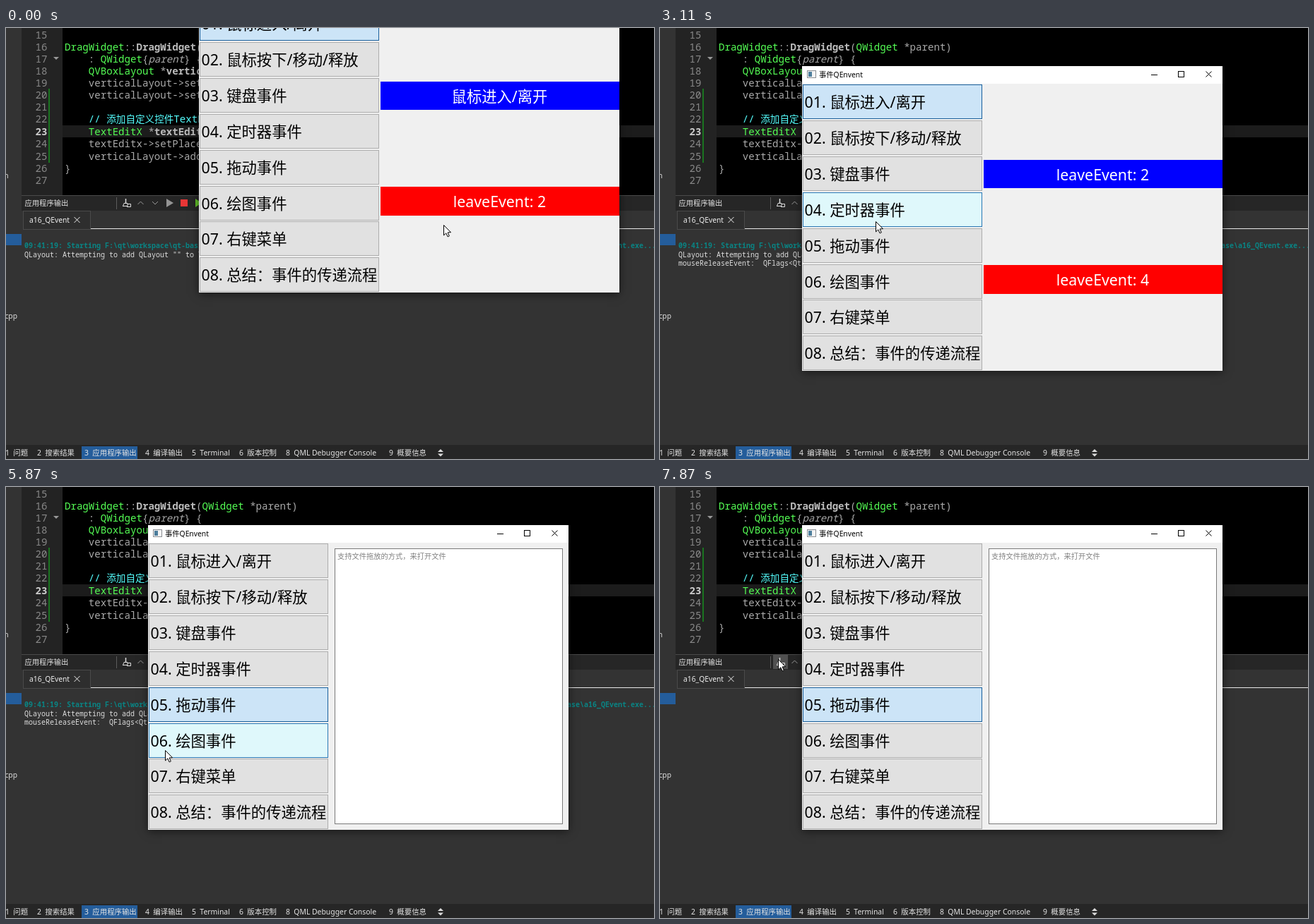
An HTML page with a canvas that plays this animation: 917x611 px, repeating every 8000 ms.

```html
<!DOCTYPE html>
<html lang="zh-CN">
<head>
<meta charset="utf-8">
<title>QEvent</title>
<style>
html, body { margin: 0; width: 100%; height: 100%; overflow: hidden; background: #333; }
canvas { display: block; }
</style>
</head>
<body>
<canvas id="stage" width="917" height="611"></canvas>
<script>
const ctx = document.getElementById('stage').getContext('2d');
const LOOP = 8000;
const UI = '"Noto Sans", "Noto Sans CJK SC", "Noto Sans CJK JP", sans-serif';
const MONO = '"Noto Sans Mono", "Noto Sans CJK SC", monospace';
const SMALL = '10.3px ' + UI;
const BIG = '21.33px ' + UI;
const LOG = '10px ' + MONO;

const rect = (x, y, w, h, color) => {
  ctx.fillStyle = color;
  ctx.fillRect(x, y, w, h);
};

const frame = (x, y, w, h, fill, edge) => {
  rect(x, y, w, h, edge);
  rect(x + 1, y + 1, w - 2, h - 2, fill);
};

const text = (s, x, y, font, color, align = 'left') => {
  ctx.font = font;
  ctx.fillStyle = color;
  ctx.textAlign = align;
  ctx.fillText(s, x, y);
};

const trace = points => {
  ctx.beginPath();
  points.forEach(([x, y], i) => i ? ctx.lineTo(x, y) : ctx.moveTo(x, y));
};

const line = (points, color, width = 1) => {
  trace(points);
  ctx.strokeStyle = color;
  ctx.lineWidth = width;
  ctx.stroke();
};

const shape = (points, color) => {
  trace(points);
  ctx.closePath();
  ctx.fillStyle = color;
  ctx.fill();
};

const cross = (x, y, r, color) => {
  line([[x - r, y - r], [x + r, y + r]], color);
  line([[x - r, y + r], [x + r, y - r]], color);
};

// ---- pointer: [first step, last step, step count, path] ----
const MOVES = [
  [70, 410, 6, [[619, 279], [628, 258], [640, 205], [655, 140], [672, 80], [690, 6], [704, -39]]],
  [810, 1030, 4, [[704, -39], [696, -27], [672, 8], [650, 46], [632, 72]]],
  [1500, 1780, 5, [[632, 72], [626, 69], [609, 76]]],
  [1850, 2270, 7, [[609, 76], [559, 87]]],
  [2340, 3110, 12, [[559, 87], [480, 135], [400, 190], [340, 240], [305, 274]]],
  [3190, 3600, 6, [[305, 274], [304, 296], [304, 309]]],
  [4130, 4410, 5, [[304, 309], [306, 268], [305, 306]]],
  [4620, 4690, 2, [[305, 306], [304, 314]]],
  [5450, 6220, 12, [[304, 313], [285, 350], [205, 380], [97, 402]]],
  [6290, 6860, 9, [[97, 402], [130, 300], [167, 244]]]
];
const PRESSES = [[740, 1300], [4760, 4900], [6930, 7130]];
const DRAG_FROM = [704, -39];
const MOVED = [72, -111];

const between = (t, a, b) => t >= a && t < b;

function along(path, f) {
  const p = f * (path.length - 1);
  const i = Math.min(Math.floor(p), path.length - 2);
  return [0, 1].map(k => path[i][k] + (path[i + 1][k] - path[i][k]) * (p - i));
}

function pointerAt(t) {
  let tip = MOVES[0][3][0];
  for (const [start, end, count, path] of MOVES) {
    if (t < start) break;
    const step = (end - start) / (count - 1);
    const k = Math.min(count, Math.floor((t - start) / step + 1e-6) + 1);
    tip = along(path, k / count).map(Math.round);
  }
  return tip;
}

function drawPointer([x, y], pressed) {
  if (pressed) {
    ctx.beginPath();
    ctx.arc(x - 0.5, y, 10, 0, Math.PI * 2);
    ctx.fillStyle = 'rgba(236,190,60,.8)';
    ctx.fill();
  }
  const arrow = [[0, 0], [0, 14.4], [3.3, 11.3], [5.6, 16.4], [7.8, 15.4], [5.6, 10.4], [10, 10.2], [0, 0]];
  const placed = arrow.map(([a, b]) => [x + 0.5 + a, y + 0.5 + b]);
  shape(placed, '#fff');
  line(placed, '#000');
}

// ---- editor ----
const CODE = 14.1;
const STYLES = {
  n: ['', '#aaa'], b: ['bold ', '#bbb'], i: ['italic ', '#aaa'],
  t: ['', '#5f5'], k: ['', '#ff5'], c: ['', '#5ff'], s: ['', '#f5f'],
  C: ['', '#5ff', 13.6], S: ['', '#f5f', 13.6]
};
const LINES = [
  [],
  ['t', 'DragWidget', 'n', '::', 'b', 'DragWidget', 'n', '(', 't', 'QWidget', 'n', ' *parent)'],
  ['n', '    : ', 't', 'QWidget', 'n', '{', 'i', 'parent', 'n', '} {'],
  ['t', '    QVBoxLayout', 'n', ' *', 'b', 'verticalLayout', 'n', ' = ', 'k', 'new', 't', ' QVBoxLayout', 'n', '(', 'k', 'this', 'n', ');'],
  ['n', '    verticalLayout->setContentsMargins(0, 0, 0, 0);'],
  ['n', '    verticalLayout->setSpacing(0);'],
  [],
  ['c', '    // ', 'C', '添加自定义控件', 'c', 'TextEditX'],
  ['t', '    TextEditX', 'n', ' *', 'b', 'textEditx', 'n', ' = ', 'k', 'new', 't', ' TextEditX', 'n', '(', 'k', 'this', 'n', ');'],
  ['n', '    textEditx->setPlaceholderText(', 's', '"', 'S', '支持文件拖放的方式，来打开文件', 's', '"', 'n', ');'],
  ['n', '    verticalLayout->addWidget(textEditx);'],
  ['n', '}'],
  []
];

function drawTokens(tokens, x, y) {
  for (let i = 0; i < tokens.length; i += 2) {
    const [face, color, size = CODE] = STYLES[tokens[i]];
    text(tokens[i + 1], x, y, `${face}${size}px ${MONO}`, color);
    x += ctx.measureText(tokens[i + 1]).width;
  }
}

function drawEditor(caret) {
  rect(22, 0, 58, 237, '#232323');
  rect(80, 0, 837, 237, '#000');
  rect(80, 138, 837, 17, '#1c1c1c');
  rect(60, 86, 2, 105, '#1a7420');
  shape([[67, 41], [75, 41], [71, 45]], '#999');
  LINES.forEach((tokens, i) => {
    const y = 15 + 17 * i + (i > 7) + 2 * (i > 9) - (i > 9);
    const here = i === 8;
    text(15 + i, 58.5, y, `${here ? 'bold ' : ''}${CODE}px ${MONO}`, here ? '#ccc' : '#888', 'right');
    drawTokens(tokens, 83, y);
  });
  if (caret) rect(321, 138, 2, 17, '#ddd');
}

// ---- output panel ----
const EXE = String.raw`09:41:19: Starting F:\qt\workspace\qt-basic\chapter02\a16_QEvent\src\build-a16_QEvent-Desktop_Qt_6_2_4_MinGW_64_bit-Release\release\a16_QEvent.exe...`;

function drawToolbar(hover) {
  rect(22, 237, 895, 22, '#262626');
  rect(22, 237, 895, 1, '#4a4a4a');
  text('应用程序输出', 26.5, 251.5, SMALL, '#e4e4e4');
  rect(156, 240, 1, 17, '#5c5c5c');
  if (hover) rect(160, 238, 21, 20, '#505050');
  line([[169.5, 242], [169.5, 248]], '#ddd', 1.5);
  line([[165.5, 252.5], [167, 248.5], [172, 248.5], [172, 252.5], [165, 252.5]], '#ddd');
  line([[172, 249.5], [176.5, 249.5], [176.5, 253.5], [171, 253.5]], '#ddd');
  line([[186.5, 250], [190.5, 246], [194.5, 250]], '#999');
  line([[207, 246], [211, 250], [215, 246]], '#999');
  shape([[227, 242], [227, 254], [237, 248]], '#949494');
  rect(247, 243, 10, 10, '#e83636');
  shape([[268, 242], [268, 254], [277, 248]], '#62c429');
}

function drawOutput(t, tip) {
  const hover = t > 6200 && between(tip[0], 160, 181) && between(tip[1], 238, 258);
  drawToolbar(hover);
  frame(24, 259, 96, 27, '#2e2e2e', '#4a4a4a');
  text('a16_QEvent', 33, 276, SMALL, '#eee');
  cross(100.5, 272, 4, '#eee');
  rect(120, 284, 797, 1, '#e8e8e8');
  if (t >= 7060) return;
  text(EXE, 26, 311.5, 'bold ' + LOG, '#0a8484');
  text('QLayout: Attempting to add QLayout "" to TextEditX "", which already has a layout', 26, 324.5, LOG, '#ddd');
  if (t >= 140)
    text('mouseReleaseEvent:  QFlags<Qt::MouseButton>(LeftButton)', 26, 337, LOG, '#ddd');
}

const PANES = [
  [-1, '1  问题'], [44, '2  搜索结果'], [111, '3  应用程序输出'], [197, '4  编译输出'],
  [263, '5  Terminal'], [330, '6  版本控制'], [396, '8  QML Debugger Console'], [542, '9  概要信息']
];

function drawIde(t, tip) {
  rect(0, 0, 917, 611, '#333');
  text('n', 3.5, 213, SMALL, '#ddd', 'right');
  rect(0, 292, 22, 16, '#245d9b');
  text('cpp', 16, 411.5, SMALL, '#ddd', 'right');
  drawEditor(between(t, 7000, 7530));
  drawOutput(t, tip);
  rect(0, 591, 917, 20, '#262626');
  rect(107, 593, 79, 18, '#245d9b');
  PANES.forEach(([x, s]) => text(s, x, 606, '10.4px ' + UI, '#e4e4e4'));
  shape([[611, 601], [619, 601], [615, 597]], '#ddd');
  shape([[611, 603.5], [619, 603.5], [615, 607.5]], '#ddd');
}

// ---- application window, in its resting coordinates ----
const ITEMS = ['鼠标进入/离开', '鼠标按下/移动/释放', '键盘事件', '定时器事件',
  '拖动事件', '绘图事件', '右键菜单', '总结：事件的传递流程'];

function drawTitle() {
  rect(201, 54, 595, 25, '#fff');
  frame(208, 60, 13, 11, '#f4f4f4', '#8b8f94');
  rect(210, 62, 5, 7, '#4d7d9c');
  text('事件QEnvent', 225, 69.5, SMALL, '#000');
  rect(695, 66, 9, 1, '#000');
  frame(733, 61, 9, 9, '#fff', '#000');
  cross(776.5, 65.5, 4, '#000');
}

function drawMenu(active, [px, py]) {
  ITEMS.forEach((name, i) => {
    const top = 80 + Math.round(i * 50.9);
    const hover = between(px, 202, 456) && between(py, top, top + 50);
    const [fill, edge] = i === active ? ['#cce4f7', '#1a609c']
      : hover ? ['#dff8fb', '#2a78b4'] : ['#e1e1e1', '#adadad'];
    frame(202, top, 254, 49, fill, edge);
    text(`0${i + 1}. ${name}`, 204.5, top + 33, BIG, '#000');
  });
}

function drawLabels(t) {
  const blue = t < 280 ? ITEMS[0] : t < 340 ? 'enterEvent: 1' : 'leaveEvent: 2';
  const red = t < 70 ? 'leaveEvent: 2' : t < 140 ? 'enterEvent: 3' : 'leaveEvent: 4';
  rect(458, 187, 338, 40, '#00f');
  text(blue, 626.5, 215.5, BIG, '#fff', 'center');
  rect(458, 336, 338, 41, '#f00');
  text(red, 626.5, 364.5, BIG, '#fff', 'center');
}

function drawWindow(t, tip) {
  const [dx, dy] = t < 1300 ? MOVED : [0, 0];
  ctx.save();
  ctx.translate(dx, dy);
  if (between(t, 7800, 7870)) ctx.globalAlpha = 0.6;
  ctx.shadowColor = 'rgba(0,0,0,.55)';
  ctx.shadowBlur = 12;
  ctx.shadowOffsetY = 2;
  rect(201, 54, 595, 432, '#f0f0f0');
  ctx.shadowColor = 'transparent';
  drawTitle();
  drawMenu(t < 4760 ? 0 : 4, [tip[0] - dx, tip[1] - dy]);
  if (t < 4900) {
    drawLabels(t);
  } else {
    frame(465, 87, 323, 391, '#fff', '#7a7a7a');
    text('支持文件拖放的方式，来打开文件', 469, 102, '10.25px ' + UI, '#808080');
  }
  ctx.restore();
}

function drawDragOutline(tip) {
  const x = MOVED[0] + tip[0] - DRAG_FROM[0];
  const y = MOVED[1] + tip[1] - DRAG_FROM[1];
  ctx.save();
  ctx.globalCompositeOperation = 'difference';
  ctx.strokeStyle = '#fff';
  ctx.lineWidth = 4;
  ctx.strokeRect(201 + x, 56 + y, 594, 431);
  ctx.restore();
}

function draw(t) {
  const tip = pointerAt(t);
  drawIde(t, tip);
  if (!between(t, 7000, 7800)) drawWindow(t, tip);
  if (between(t, 810, 1300)) drawDragOutline(tip);
  drawPointer(tip, PRESSES.some(([a, b]) => between(t, a, b)));
}

const began = performance.now();
function tick() {
  draw((performance.now() - began) % LOOP);
  requestAnimationFrame(tick);
}
tick();
</script>
</body>
</html>
```
